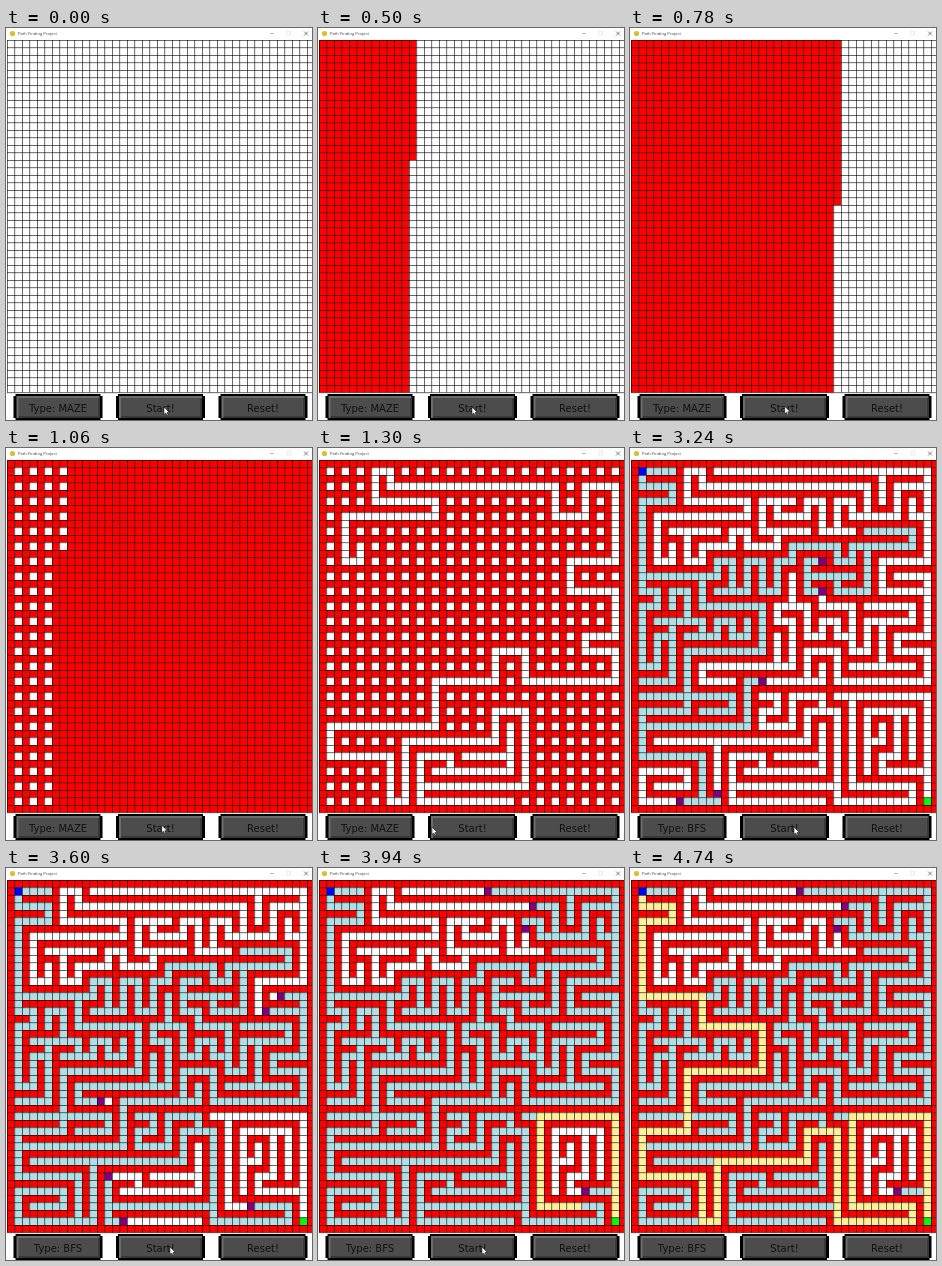
Write an HTML page with a canvas that moves like this. It is 306x392 px and loops after 4760 ms.

```html
<!DOCTYPE html>
<html lang="en">
<head>
<meta charset="utf-8">
<title>Path Finding Project</title>
<style>
  html, body { margin: 0; height: 100%; overflow: hidden; background: #fff; }
  canvas { display: block; }
</style>
</head>
<body>
<canvas id="stage" width="306" height="392"></canvas>
<script>
const ctx = document.getElementById('stage').getContext('2d');
const COLS = 41, ROWS = 47, SIZE = 7.5, LEFT = 1, TOP = 12;
const LOOP = 4760, RATE = 2.54, BUILD_AT = 272;
const SEARCH_AT = 2880, TRACE_AT = 3800, TRACE_END = 4440;
const id = (c, r) => c * ROWS + r;
const START = id(1, 1), GOAL = id(39, 45);
const DIRS = [[0, -1], [1, 0], [0, 1], [-1, 0]];

let seed = 20;
const random = () => (seed = (seed * 1664525 + 1013904223) % 4294967296) / 4294967296;

// Key corridors turn at alternating rows and columns; the rest of the maze is random.
const links = new Map();
function link(from, to) {
  const key = id(...from);
  if (!links.has(key)) links.set(key, []);
  links.get(key).push(to);
}
function corridor(c, r, vertical, turns) {
  for (const turn of turns) {
    while ((vertical ? r : c) !== turn) {
      const from = [c, r];
      if (vertical) r += 2 * Math.sign(turn - r);
      else c += 2 * Math.sign(turn - c);
      link(from, [c, r]);
      link([c, r], from);
    }
    vertical = !vertical;
  }
}
corridor(27, 43, false, [13]);
corridor(39, 45, true, [31, 29, 43, 37, 45, 27, 33, 23, 37, 11, 45, 9, 39, 1, 33, 7, 25, 17,
  19, 9, 15, 1, 5, 5, 3, 1, 1]);
corridor(5, 11, true, [13, 3, 7, 15, 5, 7, 1, 9, 3, 31, 7, 35, 3, 39, 13, 33, 17, 39, 23, 35,
  25, 39, 29, 27, 25, 23, 29, 15, 35, 1]);

// Random branches stay inside their zone.
const zone = (c, r) => r < 15 - c / 5 ? 0 : r < 30 ? 1 : c < 26 ? 2 : 3;

// Depth-first maze; opened maps a cell to the build step that clears it.
const opened = new Map();
function buildMaze() {
  const stack = [[5, 11]], seen = new Set([id(5, 11)]);
  const unseen = cell => !seen.has(id(...cell));
  let step = COLS * ROWS;
  for (let c = 1; c < COLS; c += 2)
    for (let r = 1; r < ROWS; r += 2) opened.set(id(c, r), step++);
  while (stack.length) {
    const [c, r] = stack[stack.length - 1];
    const planned = (links.get(id(c, r)) || []).find(unseen);
    const free = DIRS.map(([x, y]) => [c + 2 * x, r + 2 * y]).filter(([x, y]) =>
      x > 0 && y > 0 && x < COLS && y < ROWS && zone(x, y) === zone(c, r) &&
      !links.has(id(x, y)) && unseen([x, y]));
    const next = planned || free[Math.floor(random() * free.length)];
    step += 1.3;
    if (!next) { stack.pop(); continue; }
    opened.set(id((c + next[0]) / 2, (r + next[1]) / 2), step);
    seen.add(id(...next));
    stack.push(next);
  }
}
buildMaze();

// Breadth-first search: when each cell is found and visited.
const found = new Map([[START, 0]]), visited = new Map(), parent = new Map();
const queue = [START];
while (!visited.has(GOAL)) {
  const cell = queue.shift();
  visited.set(cell, visited.size);
  for (const [x, y] of DIRS) {
    const next = cell + id(x, y);
    if (!opened.has(next) || found.has(next)) continue;
    found.set(next, visited.size - 1);
    parent.set(next, cell);
    queue.push(next);
  }
}
const trail = new Map();
for (let cell = GOAL; cell !== undefined; cell = parent.get(cell)) trail.set(cell, trail.size);

function cellColor(cell, t) {
  if (cell === START && t >= 2160) return '#00f';
  if (cell === GOAL && t >= 2600) return '#0f0';
  const built = (t - BUILD_AT) * RATE;
  if (cell >= built) return '#fff';
  if (!(opened.get(cell) < built)) return '#f00';
  const traced = (t - TRACE_AT) / (TRACE_END - TRACE_AT) * trail.size;
  if (trail.get(cell) < traced) return '#fff099';
  const searched = (t - SEARCH_AT) / (TRACE_AT - SEARCH_AT) * visited.size;
  if (visited.get(cell) < searched) return '#b0e0e6';
  return found.get(cell) < searched ? '#800080' : '#fff';
}

function rect(color, x, y, w, h) {
  ctx.fillStyle = color;
  ctx.fillRect(x, y, w, h);
}

function text(label, x, y, font, color, align) {
  ctx.font = font;
  ctx.fillStyle = color;
  ctx.textAlign = align;
  ctx.fillText(label, x, y);
}

function drawGrid(t) {
  const width = COLS * SIZE, height = ROWS * SIZE, thin = .6;
  for (let c = 0; c < COLS; c++)
    for (let r = 0; r < ROWS; r++)
      rect(cellColor(id(c, r), t), LEFT + c * SIZE, TOP + r * SIZE, SIZE, SIZE);
  for (let c = 0; c < COLS; c++) rect('#000', LEFT + c * SIZE, TOP, thin, height);
  for (let r = 0; r <= ROWS; r++) rect('#000', LEFT, TOP + r * SIZE, width, thin);
}

function drawTitleBar() {
  ctx.fillStyle = '#d8c030';
  ctx.beginPath();
  ctx.arc(6.5, 5.5, 2.6, 0, 7);
  ctx.fill();
  text('Path Finding Project', 12, 7, '4.2px "Open Sans", sans-serif', '#444', 'left');
  rect('#888', 264, 5, 4, .6);
  ctx.strokeStyle = '#ddd';
  ctx.lineWidth = .6;
  ctx.strokeRect(281, 3.5, 3.5, 3.5);
  ctx.strokeStyle = '#333';
  ctx.stroke(new Path2D('M298 3.5l4 4m0-4l-4 4'));
}

function drawButton(x, label) {
  rect('#000', x + 2, 366, 85, 26);
  rect('#000', x, 368, 89, 22);
  rect('#6c6c6c', x + 3, 368, 83, 22);
  rect('#383838', x + 5, 388, 81, 2);
  rect('#383838', x + 84, 370, 2, 20);
  rect('#4c4c4c', x + 5, 370, 79, 18);
  text(label, x + 44.5, 384, '10px "DejaVu Sans", sans-serif', '#111', 'center');
}

// Pointer stops: time, x, y
const POINTER = [[0, 158, 379], [500, 154, 379], [1200, 156, 377], [1300, 114, 379], [1900, 60, 377],
  [2140, 12, 23], [2460, 297, 352], [2640, 297, 352], [2840, 164, 379], [4100, 164, 379]];
const ARROW = new Path2D('M0 0V7.5L1.8 6 3 8.6 4.1 8 3 5.5 5.3 5.4Z');

function drawPointer(t) {
  const i = POINTER.findIndex(stop => stop[0] > t);
  if (i < 0) return;
  const [t0, x0, y0] = POINTER[i - 1], [t1, x1, y1] = POINTER[i];
  const p = (t - t0) / (t1 - t0), ease = p * p * (3 - 2 * p);
  ctx.save();
  ctx.translate(x0 + (x1 - x0) * ease, y0 + (y1 - y0) * ease);
  ctx.fillStyle = '#fff';
  ctx.strokeStyle = '#000';
  ctx.lineWidth = .5;
  ctx.fill(ARROW);
  ctx.stroke(ARROW);
  ctx.restore();
}

function draw(now) {
  const t = Math.floor(now % LOOP / 20) * 20;
  rect('#fff', 0, 0, 306, 392);
  drawGrid(t);
  drawTitleBar();
  drawButton(7.5, t < 1920 ? 'Type: MAZE' : 'Type: BFS');
  drawButton(110, 'Start!');
  drawButton(212.5, 'Reset!');
  drawPointer(t);
  requestAnimationFrame(draw);
}
draw(performance.now());
</script>
</body>
</html>
```
